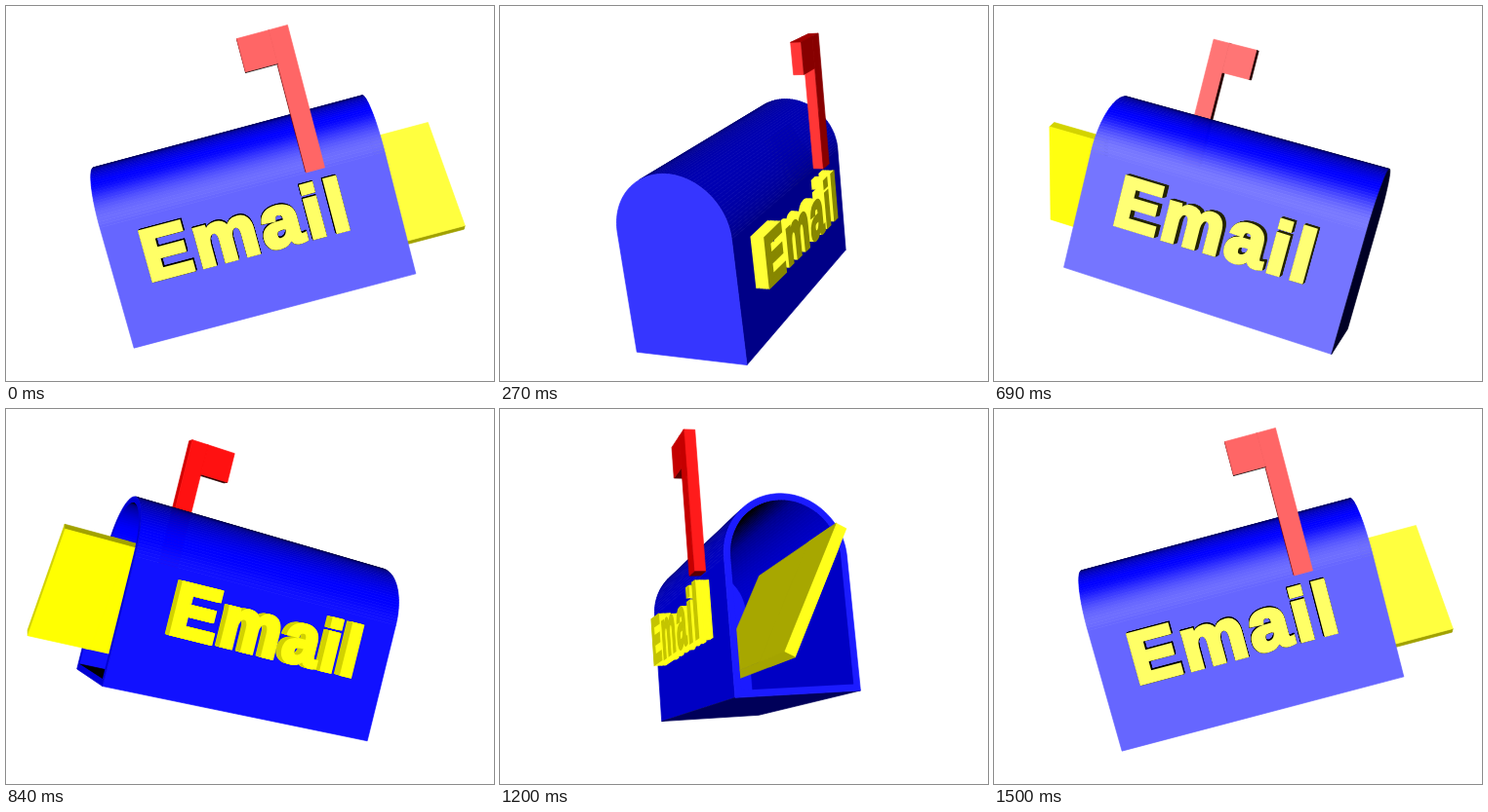
Animation of 500x385 px, one loop 1.53 s. Source, as an HTML page with a canvas:

```html
<!DOCTYPE html>
<html lang="en">
<head>
<meta charset="utf-8">
<title>Email</title>
<style>
  html, body { margin: 0; width: 100%; height: 100%; overflow: hidden; background: #fff; }
  canvas { display: block; width: 500px; height: 385px; }
</style>
</head>
<body>
<canvas id="stage" width="500" height="385"></canvas>
<script>
const ctx = document.getElementById('stage').getContext('2d');
const RAD = Math.PI / 180;

// Timing: 50 turn steps plus one rest step per loop
const STEP = 30, STEPS = 51, TURN = 7.2;

// Camera and the fixed upward tilt of the mailbox
const CX = 246.5, CY = 212, DIST = 950;
const SE = Math.sin(5 * RAD), CE = Math.cos(5 * RAD);
const SP = Math.sin(15 * RAD), CP = Math.cos(15 * RAD);
const EYE = [0, DIST * SE, DIST * CE];

const BLUE = [0, 0, 255], RED = [255, 0, 0], YELLOW = [255, 255, 0];

// Mailbox: x runs from the closed to the open end, y up, z to the flag side
const BACK = -139, OPEN = 144, HALF = 58, FLOOR = -95, WALL = 3;
const TIP = 206;
const FONT = 'bold 70px "Liberation Sans", Arial, sans-serif';
const TEXT_Y = -10, CAP = 24, DEPTH = 13, SPACING = 3.5;

let sin = 0, cos = 1;

function world([x, y, z]) {
  const a = x * CP - y * SP;
  return [a * cos + z * sin, x * SP + y * CP, z * cos - a * sin];
}

function project(p) {
  const [x, y, z] = world(p);
  const k = DIST / (DIST - z * CE - y * SE);
  return [CX + x * k, CY - (y * CE - z * SE) * k];
}

function facing(n, p) {
  const N = world(n), P = world(p);
  return N.reduce((sum, v, i) => sum + v * (EYE[i] - P[i]), 0) > 0;
}

function shade(n, rgb) {
  const [x, y, z] = world(n);
  let v = 0.32 - 0.18 * x + 0.08 * y + 0.9 * z;
  if (v < 0.55) v = Math.max(0, 2 * v - 0.55);
  const lift = v > 1 ? (v - 1) ** 2 * 2100 : 0;
  return `rgb(${rgb.map(c => Math.round(Math.min(255, c * v + lift))).join()})`;
}

function trace(points) {
  points.forEach((p, i) => {
    const [x, y] = project(p);
    i ? ctx.lineTo(x, y) : ctx.moveTo(x, y);
  });
  ctx.closePath();
}

function face(points, n, rgb) {
  if (!facing(n, points[0])) return;
  ctx.beginPath();
  trace(points);
  ctx.fillStyle = ctx.strokeStyle = shade(n, rgb);
  ctx.lineWidth = 0.7;
  ctx.fill();
  ctx.stroke();
}

const add = (...vs) => [0, 1, 2].map(i => vs.reduce((sum, v) => sum + v[i], 0));
const mul = (v, k) => v.map(c => c * k);

// Cuboid from its centre and three perpendicular half axes
function block(mid, axes, rgb) {
  axes.forEach((a, i) => {
    const b = axes[(i + 1) % 3], c = axes[(i + 2) % 3];
    for (const side of [1, -1]) {
      const o = add(mid, mul(a, side));
      const corners = [[1, 1], [1, -1], [-1, -1], [-1, 1]]
        .map(([j, k]) => add(o, mul(b, j), mul(c, k)));
      face(corners, mul(a, side / Math.hypot(...a)), rgb);
    }
  });
}

function slab(x0, x1, y0, y1, z0, z1, rgb) {
  block([(x0 + x1) / 2, (y0 + y1) / 2, (z0 + z1) / 2],
    [[(x1 - x0) / 2, 0, 0], [0, (y1 - y0) / 2, 0], [0, 0, (z1 - z0) / 2]], rgb);
}

// Cross section: straight walls under a half circle, as [y, z]
function section(r, floor) {
  const parts = 60, pts = [[floor, r]];
  for (let i = 0; i <= parts; i++) {
    const a = Math.PI * i / parts;
    pts.push([27 + r * Math.sin(a), r * Math.cos(a)]);
  }
  pts.push([floor, -r]);
  return pts;
}

const outer = section(HALF, FLOOR);
const inner = section(HALF - 6, FLOOR + 6);
const at = (ring, x) => ring.map(([y, z]) => [x, y, z]);

function shell(ring, x0, x1, dir) {
  ring.forEach(([y, z], i) => {
    const [v, w] = ring[(i + 1) % ring.length];
    const len = Math.hypot(v - y, w - z) * dir;
    face([[x0, y, z], [x1, y, z], [x1, v, w], [x0, v, w]],
      [0, (z - w) / len, (v - y) / len], BLUE);
  });
}

function envelope(x0) {
  block([(x0 + TIP) / 2, -15, 1.5],
    [[(TIP - x0) / 2, 0, 0], [0, -53, 28], [0, 2.34, 4.42]], YELLOW);
}

function opening() {
  face(at(outer, OPEN), [1, 0, 0], BLUE);
  ctx.save();
  ctx.beginPath();
  trace(at(inner, OPEN));
  ctx.clip();
  face(at(inner, BACK + WALL), [1, 0, 0], BLUE);
  shell(inner, BACK + WALL, OPEN, -1);
  envelope(5);
  ctx.restore();
  envelope(OPEN);
}

function flag() {
  const pole = () => slab(66, 84, 28, 166, HALF, 69, RED);
  const plate = () => slab(35, 66, 134, 166, HALF, 69, RED);
  const order = facing([-1, 0, 0], [66, 150, 63]) ? [pole, plate] : [plate, pole];
  order.forEach(part => part());
}

function glyph(ch, x, w, z, dir, color) {
  const mid = [x, TEXT_Y, z];
  const [l, r, t, b] = [[-dir * w / 2, 0, 0], [dir * w / 2, 0, 0], [0, CAP, 0], [0, -CAP, 0]]
    .map(d => project(add(mid, d)));
  const [ox, oy] = project(mid);
  ctx.setTransform((r[0] - l[0]) / w, (r[1] - l[1]) / w,
    (b[0] - t[0]) / (2 * CAP), (b[1] - t[1]) / (2 * CAP), ox, oy);
  ctx.fillStyle = ctx.strokeStyle = color;
  ctx.lineWidth = 4;
  ctx.fillText(ch, -w / 2, CAP);
  ctx.strokeText(ch, -w / 2, CAP);
}

function lettering(dir, centre) {
  ctx.save();
  ctx.font = FONT;
  ctx.lineJoin = 'miter';
  ctx.miterLimit = 3;
  const chars = [...'Email'].map(ch => ({ ch, w: ctx.measureText(ch).width }));
  const total = chars.reduce((sum, c) => sum + c.w + SPACING, -SPACING);
  let pos = -total / 2;
  for (const c of chars) {
    c.x = centre + dir * (pos + c.w / 2);
    pos += c.w + SPACING;
  }
  chars.sort((a, b) => world([a.x, 0, 0])[2] - world([b.x, 0, 0])[2]);
  const end = facing([1, 0, 0], [centre, TEXT_Y, dir * HALF]) ? 1 : -1;
  const edge = shade([end, 0, 0], YELLOW), front = shade([0, 0, dir], YELLOW);
  for (const { ch, x, w } of chars) {
    for (let d = 0; d <= DEPTH; d++) {
      glyph(ch, x, w, dir * (HALF + d), dir, d < DEPTH ? edge : front);
    }
  }
  ctx.restore();
}

function draw(angle) {
  sin = Math.sin(angle);
  cos = Math.cos(angle);
  ctx.fillStyle = '#fff';
  ctx.fillRect(0, 0, 500, 385);

  const flagSide = facing([0, 0, 1], [0, 0, HALF]);
  const openEnd = facing([1, 0, 0], [OPEN, 0, 0]);

  if (!flagSide) flag();
  if (!openEnd) envelope(OPEN);
  shell(outer, BACK, OPEN, 1);
  face(at(outer, BACK), [-1, 0, 0], BLUE);
  if (openEnd) opening();
  if (flagSide) lettering(1, -5);
  if (facing([0, 0, -1], [0, 0, -HALF])) lettering(-1, 1);
  if (flagSide) flag();
}

function tick() {
  const step = Math.floor(performance.now() / STEP) % STEPS;
  draw(TURN * step * RAD);
  requestAnimationFrame(tick);
}
tick();
</script>
</body>
</html>
```
